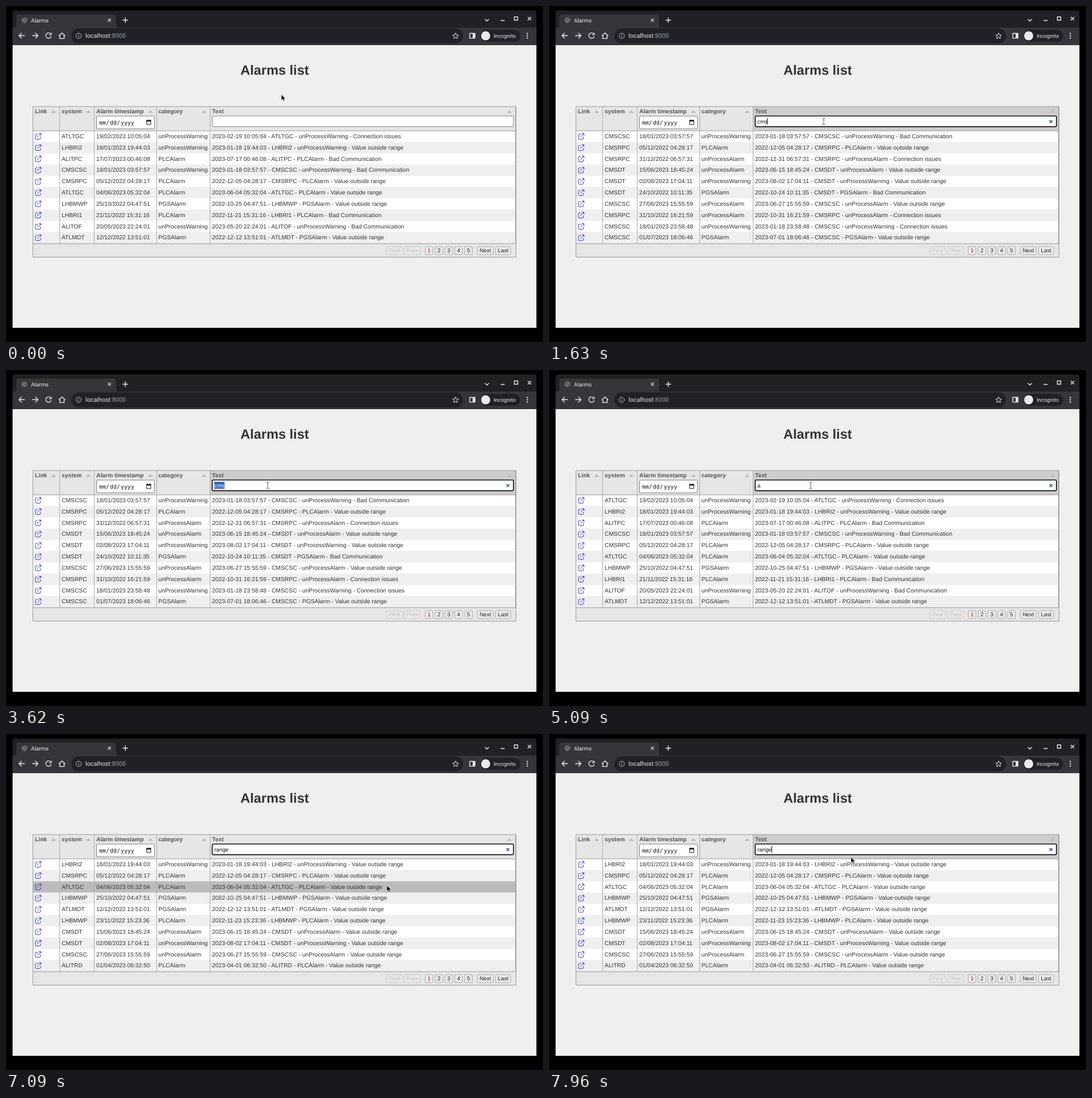
Recreate the animation shown at these times as an HTML page. Size 946 by 592 pixels, loop 8 s.

```html
<!DOCTYPE html>
<html lang="en">
<head>
<meta charset="utf-8">
<title>Alarms</title>
<style>
  html, body { margin: 0; width: 100%; height: 100%; overflow: hidden; background: #000; }
  svg { display: block; width: 946px; height: 592px; }
  text { font: 10.32px "Liberation Sans", Arial, sans-serif; fill: #333; text-rendering: geometricPrecision; white-space: pre; }
  .ui text { font-family: Roboto, "Liberation Sans", sans-serif; fill: #e8eaed; }
  .icon { fill: none; stroke: #e8eaed; stroke-width: 1.4; }
  .title { font-size: 23.6px; font-weight: bold; }
  .head text { font-weight: bold; fill: #555; }
  .date text { font: 9.8px "DejaVu Sans Mono", monospace; fill: #111; }
  .line { stroke: #aaa; fill: none; }
  .edge { stroke: #999; fill: none; }
  .pager text { font-size: 9.8px; text-anchor: middle; fill: #222; }
  .pager rect { fill: #ebebeb; stroke: #aaa; }
  .pager .off { opacity: .5; }
  .pager .off text { fill: #999; }
  .pager .on text { fill: #d00; }
  .link { fill: none; stroke: #2020d8; stroke-width: .9; stroke-linecap: round; stroke-linejoin: round; }
  #query { font-size: 9.79px; fill: #111; }
</style>
</head>
<body>
<svg viewBox="0 0 946 592">
  <rect width="946" height="592"/>
  <g class="ui">
    <path d="M11.6 69V12q0-4 4-4H930.4q4 0 4 4V69z" fill="#202124"/>
    <path d="M11.6 38H15q3 0 3-3V20q0-5 5-5H189q5 0 5 5v15q0 3 3 3H934.4V69H11.6z" fill="#35363a"/>
    <circle cx="32.5" cy="25" r="5" fill="#777a7e"/>
    <path d="M29 22q3 0 3 2t3 2v3M33 21l3 2M29 26l2 3" class="icon" style="stroke:#484a4e"/>
    <text x="44" y="28.7" style="font-size:9.8px">Alarms</text>
    <g class="icon">
      <path d="M179.5 22.3l5.4 5.4m0-5.4l-5.4 5.4" stroke-width="1.2"/>
      <path d="M205.5 25h9.4m-4.7-4.7v9.4M843.7 23.2l3.5 3.4 3.5-3.4M871.3 25.5h7M895.5 19.2h6v5.8h-6zM919.2 19.2l6 6m0-6l-6 6"/>
      <path d="M33 52.3H23m4.6-4.7L23 52.3l4.6 4.7M46.3 52.3h10m-4.6-4.7l4.6 4.7-4.6 4.7"/>
      <path d="M78.6 49A4.8 4.8 0 1 0 79.6 53.5M79.7 47.2v3.4h-3.6"/>
      <path d="M93 52.8l5.6-5.3 5.6 5.3M94.8 52v5.4h7.6V52"/>
    </g>
    <rect x="115" y="39.5" width="690" height="26.5" rx="13.2" fill="#202124"/>
    <circle cx="128" cy="52.6" r="4.7" class="icon" style="stroke-width:1;stroke:#bdc1c6"/>
    <path d="M128 52v3.1m0-5.2v1.1" class="icon" style="stroke-width:1.1;stroke:#bdc1c6"/>
    <text x="140" y="56.2" style="font-size:10.8px">localhost<tspan fill="#9aa0a6">:8000</tspan></text>
    <path d="M792 47.6l1.5 3.4 3.7.3-2.8 2.4.9 3.6-3.3-1.9-3.3 1.9.9-3.6-2.8-2.4 3.7-.3z" class="icon" style="stroke-width:1"/>
    <path d="M817 48.2h9v8.4h-9zM823 48v9" class="icon"/>
    <rect x="822.4" y="48" width="4" height="9" fill="#e8eaed"/>
    <rect x="836" y="42" width="70" height="21" rx="10.5" fill="#202124"/>
    <circle cx="845" cy="52.5" r="8" fill="#e8eaed"/>
    <text x="859" y="55.9" style="font-size:9.4px">Incognito</text>
    <g fill="#e8eaed"><circle cx="918.3" cy="48.4" r="1.2"/><circle cx="918.3" cy="52.4" r="1.2"/><circle cx="918.3" cy="56.4" r="1.2"/></g>
  </g>

  <rect x="11.6" y="69" width="922.8" height="498" fill="#efefef"/>
  <text class="title" x="413" y="120.7">Alarms list</text>

  <rect x="47" y="177" width="852" height="266" fill="#e6e6e6"/>
  <rect id="hot" x="360" y="177" width="538" height="43" fill="#cdcdcd"/>
  <g class="head" id="head"></g>
  <g class="date">
    <rect x="159.5" y="194" width="102" height="22.5" rx="1.5" fill="#fff" stroke="#808080"/>
    <text x="164" y="208.5">mm</text><text x="176" y="208.5">/</text>
    <text x="183" y="208.5">dd</text><text x="195" y="208.5">/</text>
    <text x="202.3" y="208.5">yyyy</text>
    <path d="M247.8 201.8h7.2v7h-7.2z" fill="none" stroke="#111"/>
    <path d="M247.3 201.2h8.2v2.2h-8.2zM248.6 200h1.3v2h-1.3zM252.9 200h1.3v2h-1.3z" fill="#111"/>
  </g>

  <rect id="field" x="363.3" y="193.8" width="530.6" height="18.8" fill="#fff"/>
  <rect id="mark" x="367" y="197" width="18" height="12.3" fill="#3465c4"/>
  <text id="query" x="367" y="206.6"></text>
  <path id="spell" d="M367.5 208.8H385" stroke="#e33" stroke-width="1.1" stroke-dasharray="1.4 1"/>
  <path id="caret" d="M0 197.5v11.5" stroke="#000"/>
  <path id="clear" d="M881.6 201l5 5m0-5l-5 5" stroke="#34549a" stroke-width="1.6"/>

  <g id="rows"></g>
  <path class="line" d="M94.5 177V419M155.5 177V419M265.5 177V419M359.5 177V419M897.5 177V419"/>
  <path class="edge" d="M47.5 177.2H898.5V442.5H47.5zM47 220H898M47 418.8H898"/>
  <g class="pager" id="pager"></g>

  <g id="cursor">
    <path id="arrow" d="M0 0V10.2L2.4 8.1 4 11.6 5.8 10.8 4.2 7.4 7.4 7.2z" stroke="#fff" stroke-width=".6"/>
    <path id="beam" d="M-2.4-5.4q2.4 0 2.4 1.2 0-1.2 2.4-1.2M0-4.2V4.8M-2.4 6q2.4 0 2.4-1.2 0 1.2 2.4 1.2" fill="none" stroke="#555"/>
    <path id="hand" d="M-1.3 8.2V1.2q0-1.2 1.2-1.2t1.2 1.2V5q1.5-.7 2 .5 1.4-.5 1.8.6 1.5-.2 1.5 1.2V9.8q0 1.4-1 2.6V14H-.8V12.4L-4.2 8.2q-.6-1.4.8-1.6z" fill="#fff" stroke="#333" stroke-width=".8"/>
  </g>
</svg>
<script>
const LOOP = 8000, TOP = 220, ROW = 19.83;
const $ = id => document.getElementById(id);
const show = (id, on) => $(id).style.display = on ? '' : 'none';

const CATEGORY = { W: 'unProcessWarning', A: 'unProcessAlarm', P: 'PLCAlarm', G: 'PGSAlarm' };
const MESSAGE = { C: 'Connection issues', V: 'Value outside range', B: 'Bad Communication' };
const alarms = `ATLTGC 2023-02-19 10:05:04 W C
LHBRI2 2023-01-18 19:44:03 W V
ALITPC 2023-07-17 00:46:08 P B
CMSCSC 2023-01-18 03:57:57 W B
CMSRPC 2022-12-05 04:28:17 P V
ATLTGC 2023-06-04 05:32:04 P V
LHBMWP 2022-10-25 04:47:51 G V
LHBRI1 2022-11-21 15:31:16 P B
ALITOF 2023-05-20 22:24:01 W B
ATLMDT 2022-12-12 13:51:01 G V
LHBMWP 2022-11-23 15:23:36 P V
CMSRPC 2022-12-31 06:57:31 A C
CMSDT 2023-06-15 18:45:24 A V
CMSDT 2023-08-02 17:04:11 W V
CMSDT 2022-10-24 10:11:35 G B
CMSCSC 2023-06-27 15:55:59 A V
CMSRPC 2022-10-31 16:21:59 A C
CMSCSC 2023-01-18 23:58:48 W C
ALITRD 2023-04-01 06:32:50 P V
CMSCSC 2023-07-01 18:06:46 G V`.split('\n').map(line => {
  const [system, day, time, c, m] = line.split(' ');
  return {
    system, category: CATEGORY[c],
    stamp: day.split('-').reverse().join('/') + ' ' + time,
    text: `${day} ${time} - ${system} - ${CATEGORY[c]} - ${MESSAGE[m]}`
  };
});

// Step timelines: [start, value]
const typed = [[0, ''], [990, 'c'], [1070, 'cms'], [4130, 'a'], [5180, ''],
  ...[...'range'].map((_, i) => [5420 + 75 * i, 'range'.slice(0, i + 1)])];
const filters = [[0, ''], [1500, 'cms'], [4440, 'a'], [6060, 'range']];
const carets = [[0, 0], [540, 1], [2222, 0], [4130, 1], [5090, 0], [5180, 1], [6466, 0], [7510, 1]];
const at = (list, t) => list.filter(e => e[0] <= t).pop()[1];

// Pointer moves in discrete steps along a quadratic curve
const moves = [
  { start: 430, end: 540, steps: 3, path: [[485, 156], [485, 180], [484, 203]] },
  { start: 2070, end: 2450, steps: 6, path: [[484, 203], [482, 267], [480, 331]] },
  { start: 2610, end: 3220, steps: 9, path: [[480, 331], [470, 267], [461, 203]] },
  { start: 6310, end: 7090, steps: 11, path: [[461, 203], [566, 235], [671, 267]] },
  { start: 7210, end: 7960, steps: 11, path: [[671, 267], [601, 455], [532, 217]] }
];
function pointer(t) {
  const m = moves.filter(m => m.start <= t).pop();
  if (!m) return moves[0].path[0];
  const gap = (m.end - m.start) / (m.steps - 1);
  const k = Math.min(m.steps, Math.floor((t - m.start) / gap + 1e-6) + 1) / m.steps;
  const e = k * k * (3 - 2 * k), [a, b, c] = m.path;
  return [0, 1].map(i => (1 - e) ** 2 * a[i] + 2 * e * (1 - e) * b[i] + e * e * c[i]);
}

$('head').innerHTML = [['Link', 51, 84], ['system', 98, 145], ['Alarm timestamp', 159, 254.5],
  ['category', 268.5, 349], ['Text', 363, 887]].map(([name, x, sort]) =>
  `<text x="${x}" y="189.4">${name}</text><path d="M${sort - 4.4} 188.2h8.8l-4.4-4.4z" fill="#bbb"/>`).join('');

$('pager').innerHTML = [['First', 671, 27, 'off'], ['Prev', 702, 28, 'off'], ['1', 738.5, 13.5, 'on'],
  ['2', 756, 13.5], ['3', 773.3, 13.5], ['4', 790.6, 13.5], ['5', 808, 13.5], ['Next', 830.5, 28], ['Last', 862.5, 26.5]]
  .map(([name, x, w, cls = '']) => `<g class="${cls}"><rect x="${x}" y="424" width="${w}" height="14" rx="2"/>
    <text x="${x + w / 2}" y="434.4">${name}</text></g>`).join('');

let shownFilter = null;
function drawRows(filter) {
  if (filter === shownFilter) return;
  shownFilter = filter;
  $('rows').innerHTML = alarms.filter(a => a.text.toLowerCase().includes(filter)).slice(0, 10).map((a, i) => {
    const cell = (x, s) => `<text x="${x}" y="13">${s}</text>`;
    return `<g transform="translate(0 ${TOP + ROW * i})"><rect x="48" width="850" height="${ROW}"/>
      <path class="link" d="M55.5 5.9h-2.3q-1.4 0-1.4 1.4v6q0 1.4 1.4 1.4h6q1.4 0 1.4-1.4v-2.5M55.3 11.1l6.1-6.3M58 4.6h3.6v3.7"/>
      ${cell(98, a.system)}${cell(159, a.stamp)}${cell(268.5, a.category)}${cell(363, a.text)}</g>`;
  }).join('');
}

function render(t) {
  const [x, y] = pointer(t), text = at(typed, t);
  const inHead = x > 360 && y > 177 && y < TOP;
  const inField = inHead && y > 193 && y < 214;
  const hover = Math.floor((y - TOP) / ROW);
  const focused = t >= 540, selected = t >= 3490 && t < 4130;

  drawRows(at(filters, t));
  [...$('rows').children].forEach((row, i) =>
    row.firstElementChild.setAttribute('fill', i === hover ? '#bbb' : i % 2 ? '#efefef' : '#fff'));

  show('hot', inHead);
  const field = $('field');
  field.setAttribute('stroke', focused ? '#101010' : '#808080');
  field.setAttribute('stroke-width', focused ? 1.6 : 1);
  field.setAttribute('rx', focused ? 2 : 1);

  const query = $('query');
  query.textContent = text;
  query.style.fill = selected ? '#fff' : '';
  show('mark', selected);
  show('spell', text === 'cms' && t >= 2070);
  show('clear', text);
  show('caret', at(carets, t));
  const end = text ? query.getComputedTextLength() : 0;
  $('caret').setAttribute('transform', `translate(${Math.floor(367 + end) + .5} 0)`);

  const shape = inField ? 'beam' : hover >= 0 && t < 6310 ? 'hand' : 'arrow';
  for (const id of ['arrow', 'beam', 'hand']) show(id, id === shape);
  $('cursor').setAttribute('transform', `translate(${x} ${y})`);
}

const begin = performance.now();
function frame() {
  render((performance.now() - begin) % LOOP);
  requestAnimationFrame(frame);
}
frame();
</script>
</body>
</html>
```
